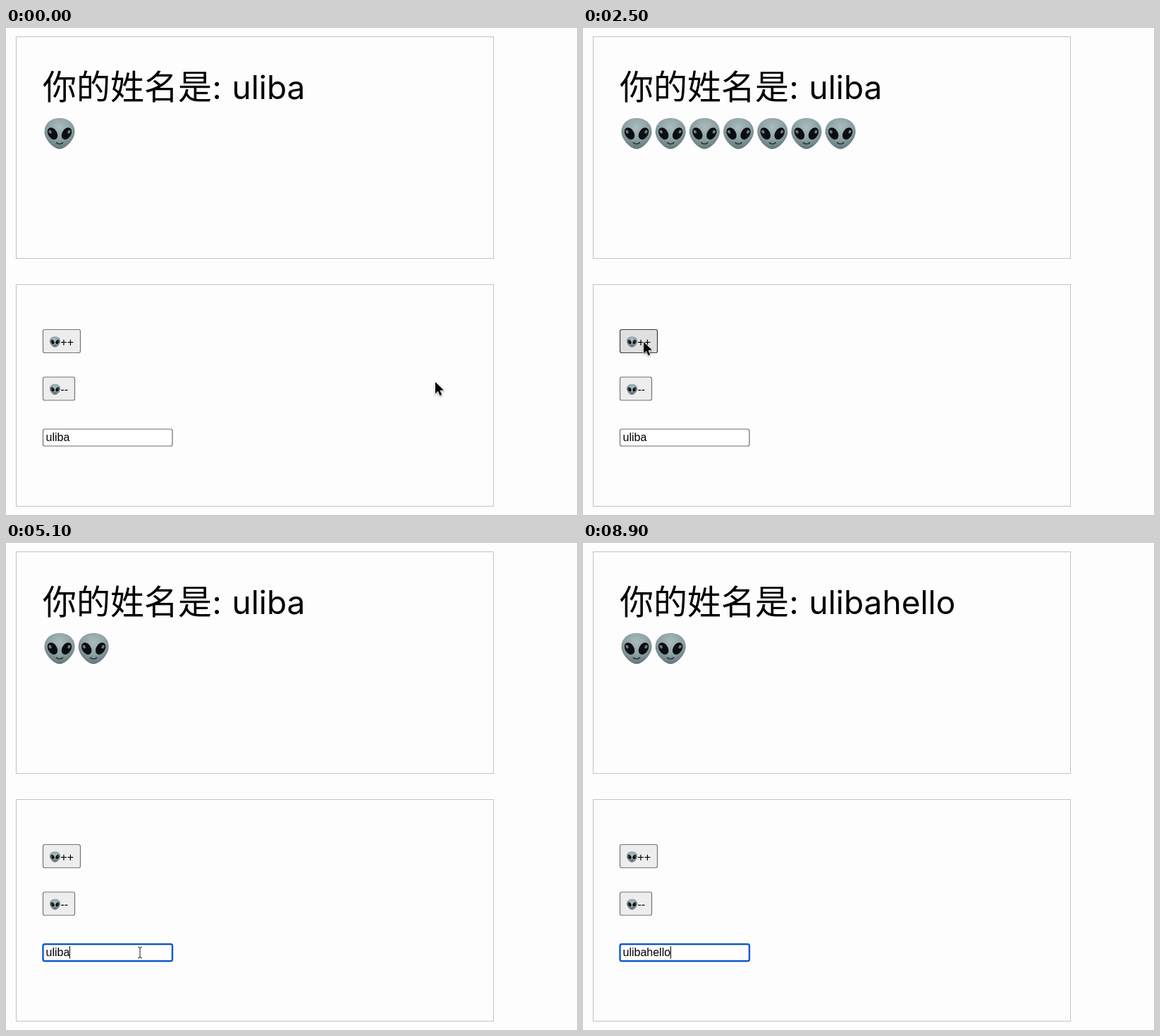
An HTML page for the animation above (9 s loop, 810 px wide and 692 px high).

```html
<!DOCTYPE html>
<html lang="zh-CN">
<head>
<meta charset="utf-8">
<style>
  html, body { margin: 0; width: 100%; height: 100%; overflow: hidden; background: #fdfdfd; }
  svg { display: block; }
  .panel { fill: none; stroke: #c1c1ca; }
  .title { font: 48px "Noto Sans CJK SC", "Noto Sans CJK", sans-serif; }
  .name { font: 46px Inter, sans-serif; white-space: pre; }
  .ui { font: 16px "Liberation Sans", Arial, sans-serif; }
  .button { fill: #ededed; stroke: #747474; stroke-width: 1.2; }
  .hover { fill: #dfdfdf; stroke: #3c3c3c; }
  .active { fill: #f3f3f3; stroke: #999; }
  .input { fill: #fff; stroke: #6d6d6d; stroke-width: 1.2; }
  .focus { stroke: #0c58d0; stroke-width: 2.4; }
</style>
</head>
<body>
<svg width="810" height="692" viewBox="0 0 810 692">
  <defs>
    <radialGradient id="skin" cx=".5" cy=".3" r=".72">
      <stop offset="0" stop-color="#a9bbbd"/>
      <stop offset=".55" stop-color="#8da1a4"/>
      <stop offset="1" stop-color="#5d7276"/>
    </radialGradient>
    <g id="eye">
      <ellipse rx="6.3" ry="9.2" fill="#0b0e10" transform="rotate(-32)"/>
      <ellipse cx="-1.6" cy="-4" rx="2" ry="2.6" fill="#70797c" transform="rotate(-32)"/>
    </g>
    <g id="face">
      <path fill="url(#skin)" d="M0-22C14-22 21.5-13 21.5-2.5C21.5 9 8 22 0 22S-21.5 9-21.5-2.5C-21.5-13-14-22 0-22Z"/>
      <use href="#eye" x="-10" y="0"/>
      <use href="#eye" transform="translate(10 0) scale(-1 1)"/>
      <path d="M-4.5 13Q0 16.5 4.5 13" fill="none" stroke="#2c383b" stroke-width="1.7" stroke-linecap="round"/>
    </g>
  </defs>

  <rect class="panel" x="14.5" y="12.5" width="677" height="315"/>
  <rect class="panel" x="14.5" y="364.5" width="677" height="315"/>

  <text class="title" x="52" y="101">你的姓名是</text>
  <text class="name" x="292.5" y="101">:</text>
  <text class="name" id="name" x="320.5" y="101"></text>
  <g id="row"></g>

  <rect id="plus" x="52.5" y="428.5" width="53" height="33" rx="2.5"/>
  <use href="#face" transform="translate(69.5 446) scale(.35)"/>
  <text class="ui" x="77.3" y="451.5">++</text>

  <rect id="minus" x="52.5" y="496" width="45" height="33" rx="2.5"/>
  <use href="#face" transform="translate(69.5 513.5) scale(.35)"/>
  <text class="ui" x="77.5" y="519">--</text>

  <rect id="input" x="52.5" y="570" width="183.5" height="24" rx="2.5"/>
  <text class="ui" id="value" x="56.5" y="587"></text>
  <path id="caret" d="M.5 573V590.5" stroke="#000"/>

  <g id="arrow" style="filter:drop-shadow(0 1px 1px #0006)">
    <path d="M0 0V16.4L3.9 12.9L6.5 19.3L9.3 18.1L6.6 11.9L11.8 11.5Z" stroke="#fff" stroke-width="1.6" paint-order="stroke"/>
  </g>
  <path id="beam" d="M-3-8Q0-8 0-6V6Q0 8-3 8M3-8Q0-8 0-6M0 6Q0 8 3 8" fill="none" stroke="#222"/>
</svg>
<script>
const LOOP = 9000, STEP = 100;
const $ = id => document.getElementById(id);

// Mouse route: time, x, y
const route = [
  [0, 609, 503], [300, 540, 530], [500, 390, 541], [800, 150, 465], [1000, 102, 434],
  [1300, 88, 446], [1800, 86, 446], [2600, 86, 446], [3000, 80, 503], [3100, 78, 515],
  [4400, 78, 515], [4700, 314, 540], [5000, 190, 574], [8500, 190, 574], [8700, 722, 614]
];
const plusClicks = [1300, 1500, 1700, 1900, 2100, 2300];
const minusClicks = [3200, 3500, 3700, 4000, 4200];
const focusTime = 5000, removeTime = 7600;
const startName = "uliba", typed = "hellow";
const keyTimes = [5800, 6000, 6300, 6500, 6700, 6900];

const past = (times, t) => times.filter(at => at <= t).length;
const show = (id, on) => $(id).style.display = on ? "" : "none";

function mouseAt(t) {
  const i = route.findIndex(p => p[0] > t);
  if (i < 0) return route.at(-1).slice(1);
  const [t0, x0, y0] = route[i - 1], [t1, x1, y1] = route[i];
  const k = (t - t0) / (t1 - t0);
  return [x0 + (x1 - x0) * k, y0 + (y1 - y0) * k];
}

function setButton(id, clicks, t, hovered) {
  const pressed = clicks.some(at => t >= at - STEP && t < at);
  $(id).setAttribute("class", "button" + (pressed ? " active" : hovered ? " hover" : ""));
}

function draw(t) {
  const [x, y] = mouseAt(t);
  const over = (top, bottom, right) => x >= 52 && x <= right && y >= top && y <= bottom;
  setButton("plus", plusClicks, t, over(428, 462, 106));
  setButton("minus", minusClicks, t, over(496, 529, 98));

  const count = 1 + past(plusClicks, t) - past(minusClicks, t);
  [...$("row").children].forEach((face, i) => face.style.display = i < count ? "" : "none");

  const letters = past(keyTimes, t) - (t >= removeTime);
  const name = startName + typed.slice(0, letters);
  $("name").textContent = $("value").textContent = name;

  const focused = t >= focusTime;
  $("input").setAttribute("class", focused ? "input focus" : "input");
  const lastKey = [focusTime, ...keyTimes, removeTime].filter(at => at <= t).at(-1);
  show("caret", focused && (t - lastKey) % 1000 < 500);
  $("caret").setAttribute("transform", `translate(${Math.round(56.5 + $("value").getComputedTextLength())})`);

  show("arrow", t < focusTime || (t >= 8600 && t < 8800));
  show("beam", focused && t < keyTimes[0]);
  for (const id of ["arrow", "beam"]) $(id).setAttribute("transform", `translate(${x} ${y + (id === "beam" ? 8 : 0)})`);
}

$("row").innerHTML = Array.from({ length: 7 }, (_, i) =>
  `<use href="#face" x="${76 + 48.2 * i}" y="150"/>`).join("");

const start = performance.now();
let shown = -1;
function tick() {
  const t = Math.floor((performance.now() - start) % LOOP / STEP) * STEP;
  if (t !== shown) draw(shown = t);
  requestAnimationFrame(tick);
}
tick();
</script>
</body>
</html>
```
